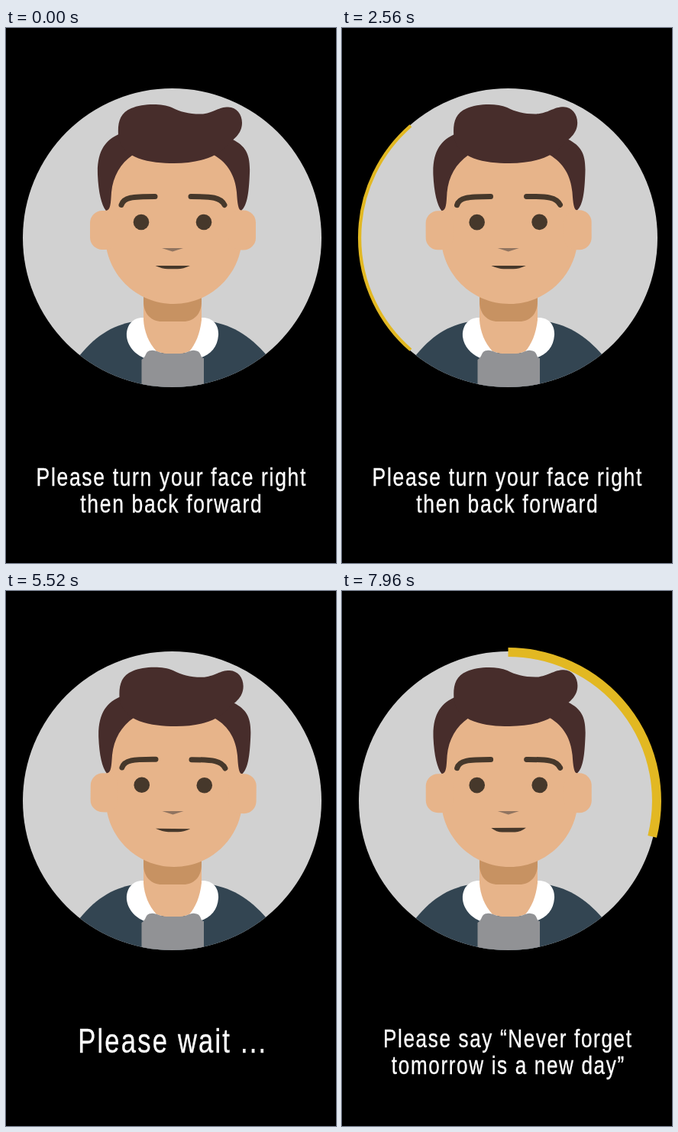
Animation, 432 px wide and 700 px high, one loop 8 s. Source, as an HTML page:

```html
<!DOCTYPE html>
<html lang="en">
<head>
<meta charset="utf-8">
<title>Face check</title>
<style>
  html, body { margin: 0; width: 100%; height: 100%; overflow: hidden; background: #000; }
  svg { display: block; width: 100%; height: 100%; }
  text { font-family: "Liberation Sans", Arial, sans-serif; fill: #fff; stroke: #fff; stroke-width: .4; text-anchor: middle; }
</style>
</head>
<body>
<svg viewBox="0 0 432 700">
  <defs><clipPath id="disc"><circle cx="217.5" cy="274.5" r="195.5"/></clipPath></defs>
  <circle cx="217.5" cy="274.5" r="195.5" fill="#d1d1d1"/>
  <g clip-path="url(#disc)">
    <path fill="#334552" d="M92 434C115 404 138 389 168 384H268C298 389 323 405 346 434V480H92Z"/>
    <path fill="#fff" d="M181 379C165 378 157 390 158 404C160 419 172 429 184 433L205 424H232L253 432C268 428 277 417 278 402C279 388 270 378 256 379Z"/>
    <path fill="#e7b48a" d="M180 340H256V382C254 400 248 414 240 423L220 430L197 423C187 412 181 398 180 382Z"/>
    <path fill="#c79262" d="M180 340H256V358C256 374 246 384 232 384H204C190 384 180 374 180 358Z"/>
    <path fill="#919295" d="M177.500 434Q181 432 183 427Q185 422 190 422C197 421 200 426 210 426H228C238 426 240 421 247 422Q253 422 255 428Q256 432 259 432V480H177.500Z"/>
  </g>
  <g id="head">
    <path fill="#e7b48a" d="M130 272C130 321 170 361 219.500 361C269 361 309 321 309 272V240C309 190 290 150 220 150C150 150 130 190 130 240Z"/>
    <g fill="#472d2b"><path id="sides"/><path id="tuft"/></g>
    <g id="earL">
      <rect x="110" y="239" width="36" height="51" rx="16" fill="#e7b48a"/>
      <path id="shadeL" fill="#c79262" d="M113 284Q119 290 127 290Q136 290 141 285Q136 293 127 293Q117 293 113 284Z"/>
    </g>
    <g id="earR">
      <rect x="291" y="238.500" width="36" height="52" rx="16" fill="#e7b48a"/>
      <path id="shadeR" fill="#c79262" d="M299 286Q305 291 311 290Q318 290 322 285Q318 293 311 293Q303 293 299 286Z"/>
    </g>
    <g fill="none" stroke="#46382b" stroke-width="7" stroke-linecap="round"><path id="browL"/><path id="browR"/></g>
    <g fill="#46382b">
      <ellipse id="eyeL" cy="254" ry="10.300"/><ellipse id="eyeR" cy="254" ry="10.300"/>
      <path id="mouth"/>
    </g>
    <path id="nose" fill="#907460"/>
  </g>
  <path id="arc" fill="none"/>
  <g id="caption"></g>
</svg>
<script>
const LOOP = 8000, YELLOW = '#e2b822', GREEN = '#3fae1a';
const CX = 217.5, CY = 274.5, R = 194.4;
const el = {};
document.querySelectorAll('[id]').forEach(n => el[n.id] = n);
const set = (id, attrs) => { for (const k in attrs) el[id].setAttribute(k, attrs[k]); };

// Each shape is given facing left, forward and right.
const shapes = {
  sides: [
    'M146 168C138 178 132 190 130 205C129 212 128 218 129 225C131 222 133 218 134 212C138 195 146 180 158 166L251 162C270 180 284 198 285 225C286 236 296 248 316 248C317 230 318 212 318 190C319 163 306 146 279 134Z',
    'M150 138C130 146 119 161 120 192C121 215 125 232 131 239C137 238 137 230 138 215C140 194 150 177 166 166L272 166C291 177 300 194 302 215C303 230 304 238 308 239C316 232 318 215 319 190C320 165 314 155 297 146Z',
    'M186 127C140 140 122 150 121 183C121 215 122 240 129 264C150 262 165 250 165 222C167 200 178 184 198 166L284 166C294 180 302 195 307 215C308 219 309 222 310 225C310 218 309 212 307 205C303 190 296 178 286 165Z'],
  tuft: [
    'M137 140C135 124 139 112 153 105C166 99 185 98 197 104C208 111 220 114 236 112C246 110 252 103.5 263 103.5C274 104 281 113 281 124C281 136 272 142 264 151C250 168 226 177 200 177C160 177 140 165 137 140Z',
    'M147 140C146 124 149 111 164 105C178 99 203 98 217 104C229 110 240 113 258 112.5C274 110 278 103.5 291 103.5C302 104 309 113 309 124C309 140 296 146 290 153C276 170 250 177 220 177C190 177 150 172 147 140Z',
    'M186 140C184 122 190 111 202 105C216 99 238 98 250 104C258 109 262 113 276 112C290 110 294 103.5 304 103.5C314 104 319 113 319 124C319 138 312 149 302 157C288 170 268 177 245 177C215 177 188 170 186 140Z'],
  browL: ['M134 232.5C136 223.5 144 220.5 161 220.5', 'M151 231.5C154 221.5 165 220.5 195 220.5', 'M234 232.5C235 223.5 240 220.5 257 220.5'],
  browR: ['M194 219.5C212 219.5 218 222.5 220 231.5', 'M242 220.5C270 220.5 281 221.5 286 231.5', 'M288 219.5C303 219.5 308 222.5 310 231.5'],
  nose: ['M165 288H188L176 292.5Z', 'M204 288H232L218 292.5Z', 'M261 288H283L272 292.5Z']
};

const lerp = (a, b, k) => a + (b - a) * k;
const NUM = /-?\d+(\.\d+)?/g;
function mixPath(a, b, k) {
  const to = b.match(NUM);
  let i = 0;
  return a.replace(NUM, n => lerp(+n, +to[i++], k).toFixed(2));
}

// Smooth value between [time, value] keys.
function ease(t, keys) {
  if (t <= keys[0][0]) return keys[0][1];
  for (let i = 1; i < keys.length; i++) {
    const [t0, v0] = keys[i - 1], [t1, v1] = keys[i];
    if (t < t1) {
      const x = (t - t0) / (t1 - t0);
      return lerp(v0, v1, x * x * (3 - 2 * x));
    }
  }
  return keys[keys.length - 1][1];
}

const TURN = 2400;
const turnKeys = [[500, 0], [1250, 1], [1790, 1], [2350, 0]];
const widthKeys = [[0, 0], [400, 12], [1150, 12], [1280, 16], [1420, 12], [2050, 12], [2380, 0]];
const tiltKeys = [[0, 0], [2300, -0.2], [2700, -0.2], [3000, 0], [5000, 0], [5520, 0.4], [5950, 0.35],
  [6560, -0.3], [7040, -1], [7600, -0.9], [7960, -0.15]];

const captions = [
  [0, 33.7, [['Please turn your face right', 216, 599], ['then back forward', 216, 634]]],
  [2720, 33.7, [['Please turn your face left', 216, 599], ['then back forward', 216, 634]]],
  [4800, 44, [['Please wait ...', 217.5, 603.5]]],
  [6320, 33.2, [['Please say “Never forget', 216.5, 597], ['tomorrow is a new day”', 217, 632]]]
];
let shown = null;
function drawCaption(t) {
  const cap = captions.filter(c => t >= c[0]).pop();
  if (cap === shown) return;
  shown = cap;
  const [, size, lines] = cap;
  el.caption.innerHTML = lines.map(([s, x, y]) =>
    `<text transform="translate(${x + 0.8} ${y}) scale(.785 1)" font-size="${size}" letter-spacing="${size * 0.064}">${s}</text>`).join('');
}

// Angles in degrees clockwise from twelve o'clock.
function arcPath(from, to) {
  const pt = a => {
    const r = a * Math.PI / 180;
    return `${(CX + R * Math.sin(r)).toFixed(2)} ${(CY - R * Math.cos(r)).toFixed(2)}`;
  };
  return `M${pt(from)}A${R} ${R} 0 ${to - from > 180 ? 1 : 0} 1 ${pt(to)}`;
}

function drawArc(t) {
  const sayAt = 6575;
  if (t >= sayAt) {
    set('arc', { d: arcPath(0, (t - sayAt) * 0.075), stroke: YELLOW, 'stroke-width': 12 });
    return;
  }
  const left = t >= TURN, s = left ? t - TURN : t;
  const mid = left ? 270 : 90;
  set('arc', {
    d: arcPath(mid - 49, mid + 49),
    stroke: s < 1200 ? YELLOW : GREEN,
    'stroke-width': ease(s, widthKeys).toFixed(2)
  });
}

function drawHead(t) {
  const yaw = t < TURN ? ease(t, turnKeys) : -1.28 * ease(t - TURN, turnKeys);
  const k = Math.abs(yaw), side = yaw < 0 ? 0 : 2;
  const pose = (...v) => lerp(v[1], v[side], k);

  for (const id in shapes) set(id, { d: mixPath(shapes[id][1], shapes[id][side], k) });
  set('eyeL', { cx: pose(142, 177, 238), rx: pose(8.8, 10.3, 8.5) });
  set('eyeR', { cx: pose(211.5, 259, 305.5), rx: pose(8.8, 10.3, 8.5) });
  set('earL', { transform: `translate(${pose(22, 0, 17)} 0)` });
  set('earR', { transform: `translate(${pose(-11, 0, -22)} 0)` });
  set('shadeL', { opacity: Math.max(0, yaw) });
  set('shadeR', { opacity: Math.min(1, Math.max(0, -yaw)) });

  const talk = ease(t, [[6620, 0], [6720, 1]]) * (0.5 + 0.5 * Math.cos((t - 7040) / 397 * 2 * Math.PI));
  const a = pose(158, 195.5, 253), b = pose(196, 241, 291), w = b - a;
  const top = 311 - 3.8 * talk, low = 315.2 + 1.2 * talk, in1 = w * lerp(0.2, 0.04, talk), in2 = w * lerp(0.36, 0.2, talk);
  set('mouth', { d: `M${a} ${top}H${b}Q${b - in1} ${low} ${b - in2} ${low}H${a + in2}Q${a + in1} ${low} ${a} ${top}Z` });
  set('head', { transform: `rotate(${ease(t, tiltKeys)} 218 361)` });
}

function frame(now) {
  const t = now % LOOP;
  drawHead(t);
  drawArc(t);
  drawCaption(t);
}

const start = performance.now();
function tick() {
  frame(performance.now() - start);
  requestAnimationFrame(tick);
}
tick();
</script>
</body>
</html>
```
